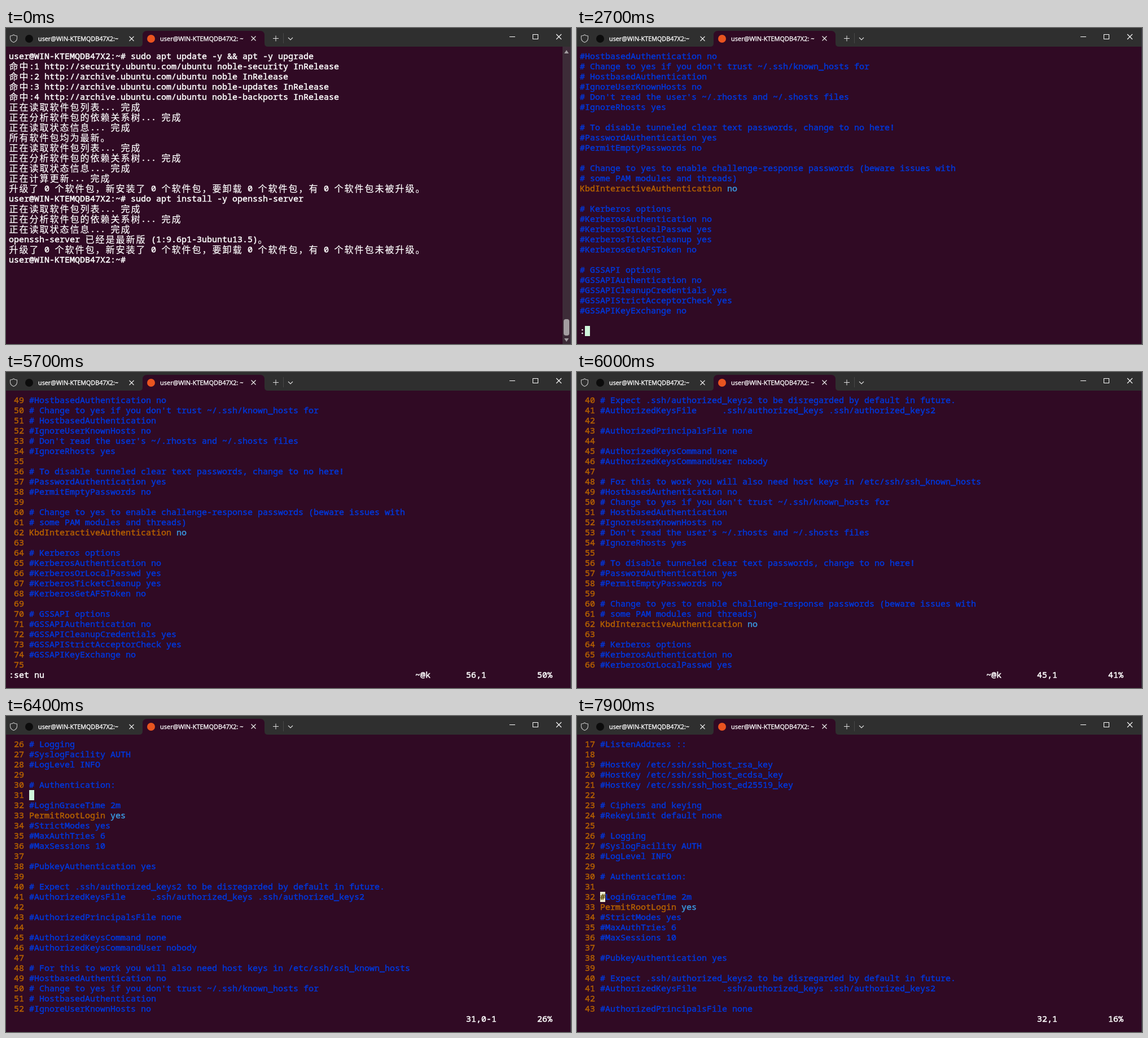
Animation, 1001 px wide and 559 px high, one loop 8 s. Source, as an HTML page with a canvas:

```html
<!DOCTYPE html>
<html lang="zh-CN">
<head>
<meta charset="utf-8">
<title>Terminal</title>
<style>
html, body { margin: 0; width: 100%; height: 100%; overflow: hidden; background: #300a24; }
canvas { display: block; }
</style>
</head>
<body>
<canvas id="stage" width="1001" height="559"></canvas>
<script>
const ctx = document.getElementById('stage').getContext('2d');
const LOOP = 8000, CELL = 9, ROW = 18, LEFT = 5, TOP = 41;
const BG = '#300a24', WHITE = '#ffffff', BLUE = '#0037da', ORANGE = '#b35f00', CYAN = '#3a96dd', CURSOR = '#cff5db';
const LATIN = '15px "Noto Sans Mono", "DejaVu Sans Mono", monospace';
const HAN = '16px "Noto Sans CJK SC", "Noto Sans CJK", sans-serif';
const HOST = 'user@WIN-KTEMQDB47X2';
const PROMPT = HOST + ':~# ';
const COMMAND = 'sudo vim /etc/ssh/sshd_config';

const counts = '升级了 0 个软件包，新安装了 0 个软件包，要卸载 0 个软件包，有 0 个软件包未被升级。';
const reading = ['正在读取软件包列表... 完成', '正在分析软件包的依赖关系树... 完成', '正在读取状态信息... 完成'];
const shell = [
  PROMPT + 'sudo apt update -y && apt -y upgrade',
  '命中:1 http://security.ubuntu.com/ubuntu noble-security InRelease',
  '命中:2 http://archive.ubuntu.com/ubuntu noble InRelease',
  '命中:3 http://archive.ubuntu.com/ubuntu noble-updates InRelease',
  '命中:4 http://archive.ubuntu.com/ubuntu noble-backports InRelease',
  ...reading,
  '所有软件包均为最新。',
  ...reading,
  '正在计算更新... 完成',
  counts,
  PROMPT + 'sudo apt install -y openssh-server',
  ...reading,
  'openssh-server 已经是最新版 (1:9.6p1-3ubuntu13.5)。',
  counts,
  PROMPT
];

const FIRST = 17;
const config = `#ListenAddress ::

#HostKey /etc/ssh/ssh_host_rsa_key
#HostKey /etc/ssh/ssh_host_ecdsa_key
#HostKey /etc/ssh/ssh_host_ed25519_key

# Ciphers and keying
#RekeyLimit default none

# Logging
#SyslogFacility AUTH
#LogLevel INFO

# Authentication:

#LoginGraceTime 2m
PermitRootLogin yes
#StrictModes yes
#MaxAuthTries 6
#MaxSessions 10

#PubkeyAuthentication yes

# Expect .ssh/authorized_keys2 to be disregarded by default in future.
#AuthorizedKeysFile     .ssh/authorized_keys .ssh/authorized_keys2

#AuthorizedPrincipalsFile none

#AuthorizedKeysCommand none
#AuthorizedKeysCommandUser nobody

# For this to work you will also need host keys in /etc/ssh/ssh_known_hosts
#HostbasedAuthentication no
# Change to yes if you don't trust ~/.ssh/known_hosts for
# HostbasedAuthentication
#IgnoreUserKnownHosts no
# Don't read the user's ~/.rhosts and ~/.shosts files
#IgnoreRhosts yes

# To disable tunneled clear text passwords, change to no here!
#PasswordAuthentication yes
#PermitEmptyPasswords no

# Change to yes to enable challenge-response passwords (beware issues with
# some PAM modules and threads)
KbdInteractiveAuthentication no

# Kerberos options
#KerberosAuthentication no
#KerberosOrLocalPasswd yes
#KerberosTicketCleanup yes
#KerberosGetAFSToken no

# GSSAPI options
#GSSAPIAuthentication no
#GSSAPICleanupCredentials yes
#GSSAPIStrictAcceptorCheck yes
#GSSAPIKeyExchange no
`.split('\n');

// [time, cursor line] and [time, command line]
const moves = [[0, 62], [5100, 61], [5500, 60], [5600, 59], [5700, 56], [5800, 52], [5900, 49], [6000, 45],
  [6100, 41], [6200, 38], [6300, 34], [6400, 31], [6500, 27], [6600, 24], [6700, 22], [7100, 23],
  [7600, 24], [7700, 26], [7800, 29], [7900, 32]];
const typed = [[2700, ':'], [2900, ':s'], [3000, ':se'], [3100, ':set '], [3400, ':set n'], [3600, ':set nu']];

const past = (list, t) => list.filter(step => step[0] <= t);
const latest = (list, t) => past(list, t).pop()[1];

function rect(x, y, w, h, color) {
  ctx.fillStyle = color;
  ctx.fillRect(x, y, w, h);
}

function cell(col, row, color, span = 1) {
  rect(LEFT + col * CELL, TOP + row * ROW, span * CELL, ROW, color);
}

// A thin outline gives a weight between regular and bold.
function print(text, x, y, font, color, weight) {
  ctx.font = font;
  ctx.fillStyle = ctx.strokeStyle = color;
  ctx.lineWidth = weight;
  ctx.fillText(text, x, y);
  ctx.strokeText(text, x, y);
}

// Writes on the character grid; Han characters take two cells.
function write(text, col, row, color = WHITE) {
  for (const ch of text) {
    const wide = ch > '\u2fff', x = LEFT + col * CELL, y = TOP + row * ROW;
    if (wide) print(ch, x + 0.5, y + 14.5, HAN, color, 0.2);
    else print(ch, x, y + 14, LATIN, color, 0.5);
    col += wide ? 2 : 1;
  }
}

function line(color, width, ...points) {
  ctx.strokeStyle = color;
  ctx.lineWidth = width;
  ctx.beginPath();
  points.forEach(([x, y], i) => i ? ctx.lineTo(x, y) : ctx.moveTo(x, y));
  ctx.stroke();
}

function cross(x, y, r, color = '#f0f0f0') {
  line(color, 1.1, [x - r, y - r], [x + r, y + r]);
  line(color, 1.1, [x - r, y + r], [x + r, y - r]);
}

function fillPath(color, path) {
  ctx.fillStyle = color;
  ctx.fill(new Path2D(path));
}

function dot(x, y, r, color) {
  ctx.fillStyle = color;
  ctx.beginPath();
  ctx.arc(x, y, r, 0, 7);
  ctx.fill();
}

function label(text, x, size) {
  print(text, x, 23, size + 'px "Open Sans", "Noto Sans", sans-serif', WHITE, 0.35);
}

function titleBar() {
  rect(0, 0, 1001, 33, '#2f2f2f');
  fillPath(BG, 'M236 33Q242 33 242 27V13Q242 5 250 5H450Q458 5 458 13V27Q458 33 464 33Z');
  ctx.strokeStyle = '#c4c4c4';
  ctx.lineWidth = 1.1;
  ctx.stroke(new Path2D('M13.5 12Q16 14 19.5 14V18Q19.5 23 13.5 25.5Q7.5 23 7.5 18V14Q11 14 13.5 12Z'));
  dot(41, 19, 7, '#0c0c0c');
  dot(257, 19, 7, '#e95420');
  label(HOST + ':~', 57, 10.8);
  label(HOST + ': ~', 273, 11);
  cross(222.5, 19, 4);
  cross(438.5, 18.5, 4);
  line('#e0e0e0', 1, [473, 18.5], [483, 18.5]);
  line('#e0e0e0', 1, [478, 13.5], [478, 23.5]);
  line('#484848', 1, [491.5, 9], [491.5, 27]);
  line('#e0e0e0', 1.1, [500, 17], [504, 21], [508, 17]);
  line(WHITE, 1, [892, 15.5], [902, 15.5]);
  ctx.strokeRect(933.5, 11.5, 9, 8);
  cross(979.5, 15.5, 4.5, WHITE);
}

function scrollBar(t) {
  if (t < 600) {
    ctx.globalAlpha = t < 500 ? 1 : 0.5;
    rect(986, 33, 14, 526, '#3d2c38');
    fillPath('#a39da1', 'M993 39L997 45H989ZM993 555L997 549H989Z');
    ctx.beginPath();
    ctx.roundRect(988, 515, 10, 29, 4);
    ctx.fill();
    ctx.globalAlpha = 1;
  } else if (t < 1600) {
    rect(994, 515, 2, 28, '#a39da1');
  }
}

function drawShell(t) {
  shell.forEach((text, row) => write(text, 0, row));
  const row = shell.length - 1, col = PROMPT.length;
  if (t >= 1100) {
    cell(col, row, WHITE, COMMAND.length);
    write(COMMAND, col, row, BG);
    cell(col + COMMAND.length, row, CURSOR);
  } else if (t >= 200) {
    cell(col, row, CURSOR);
  }
}

function drawEditor(t) {
  const numbered = t >= 3900, indent = numbered ? 4 : 0;
  const current = latest(moves, t);
  const top = Math.min(49, ...past(moves, t).map(step => step[1] - 5));
  const textOf = n => config[n - FIRST] || '';
  const busy = t >= 5600 && t < 6300;

  for (let row = 0; row < 27; row++) {
    const text = textOf(top + row);
    if (numbered) write(String(top + row).padStart(3), 0, row, ORANGE);
    if (text[0] === '#' || !text) {
      write(text, indent, row, BLUE);
    } else {
      const gap = text.indexOf(' ');
      write(text.slice(0, gap), indent, row, ORANGE);
      write(text.slice(gap), indent + gap, row, CYAN);
    }
  }

  if (t >= 2700 && !numbered) {
    const entry = latest(typed, t);
    write(entry, 0, 27);
    cell(entry.length, 27, CURSOR);
    return;
  }
  if (!numbered) write('"/etc/ssh/sshd_config" 122L, 3254B', 0, 27);
  else if (t < 5800) write(':set nu', 0, 27);
  if (busy) write('~@k', 80, 27);
  write(current + (textOf(current) ? ',1' : ',0-1'), 90, 27);
  write(Math.floor((top - 1) * 100 / 95) + '%', 104, 27);

  if (!busy && !(t >= 7100 && t < 7200)) {
    const ch = textOf(current)[0];
    cell(indent, current - top, ch ? '#eef0d4' : CURSOR);
    if (ch) write(ch, indent, current - top, '#5a4600');
  }
}

function draw(now) {
  // Snap to the 100 ms beat of the screen updates.
  const t = Math.floor(now % LOOP / 100) * 100;
  rect(0, 0, 1001, 559, BG);
  titleBar();
  (t < 1500 ? drawShell : drawEditor)(t);
  scrollBar(t);
  rect(1000, 0, 1, 559, '#3c3a46');
  requestAnimationFrame(draw);
}
requestAnimationFrame(draw);
</script>
</body>
</html>
```
